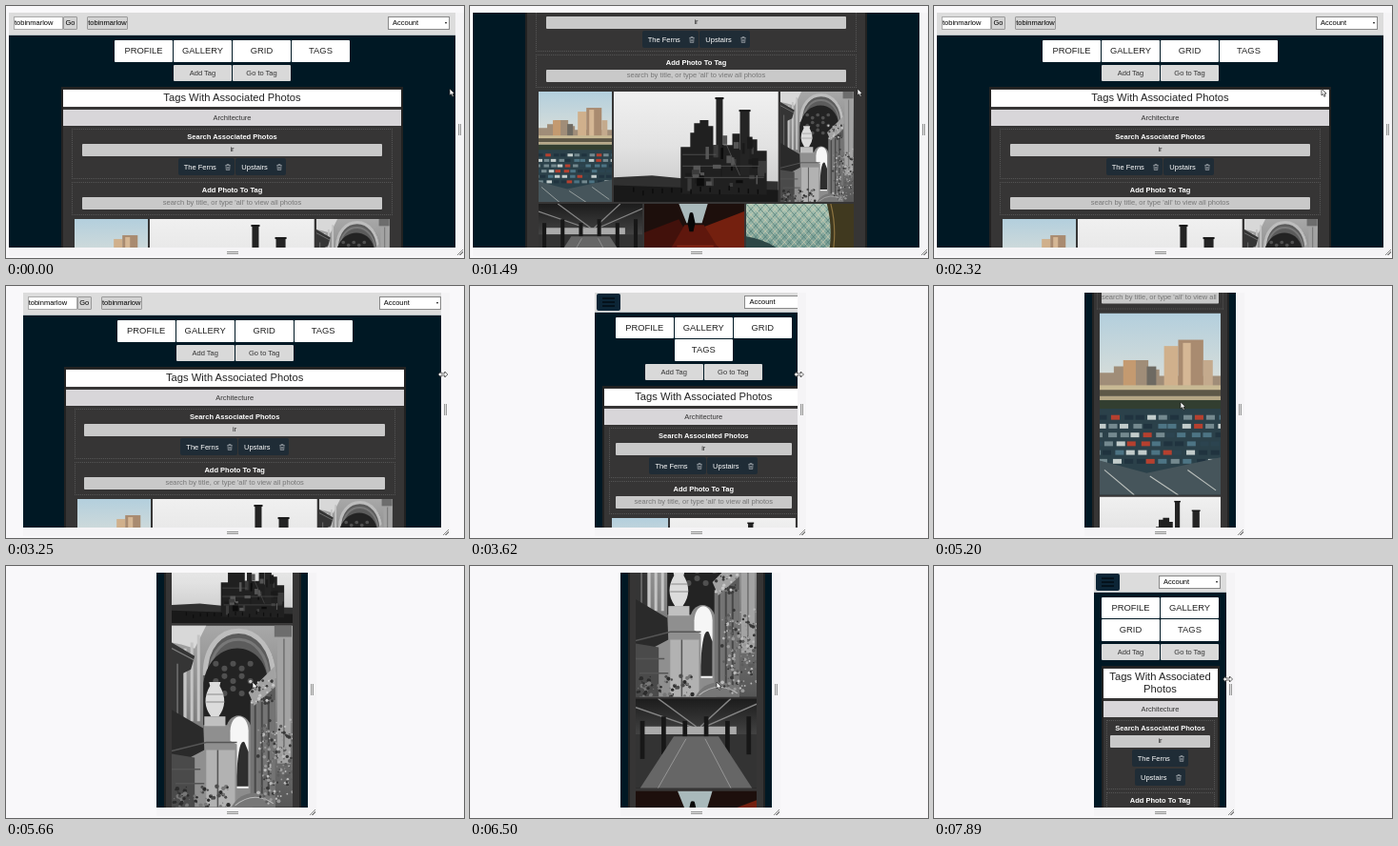
An HTML page that plays this animation: 481 px wide and 265 px high, repeating every 7990 ms.

```html
<!DOCTYPE html>
<html lang="en">
<head>
<meta charset="utf-8">
<title>Responsive photo tags</title>
<style>
* { box-sizing: border-box; }
html, body { margin: 0; width: 100%; height: 100%; overflow: hidden; }
body { position: relative; background: #f9f8fa; font: 7.5px/9px "Liberation Sans", Arial, sans-serif; color: #222; }
#tray, #view, #page, .grip, .cursor, header > * { position: absolute; }
#tray { top: 7px; height: 256px; background: #f5f4f6; }
#view { top: 7px; height: 247px; overflow: hidden; background: #001824; }
#page { left: 0; top: 0; min-height: 1100px; background: #001824; }

header { position: relative; height: 24px; background: #dcdcdc; border-bottom: 1px solid #b5bcc0; }
header > * { top: 4px; height: 14px; line-height: 12px; color: #000; white-space: nowrap; }
.box { background: #fff; border: 1px solid #aaa; overflow: hidden; }
.key { background: #d4d4d4; border: 1px solid #999; text-align: center; border-radius: 1px; }
.find { left: 5px; width: 52px; }
.go { left: 57px; width: 15px; }
.user { left: 82px; width: 43px; }
.account { right: 6px; width: 65px; padding-left: 4px; border-color: #888; }
.account::after { content: ""; position: absolute; right: 2px; top: 5px; border: 1.5px solid transparent; border-top: 2.5px solid #000; }
.menu { display: none; left: 2px; top: 1px; width: 25px; height: 18px; background: #0c2536; border-radius: 2px; padding: 4px 6px; }
.menu i { display: block; height: 1.5px; margin-bottom: 2.7px; background: #04111b; }
.narrow header { height: 20.5px; }
.narrow .find, .narrow .go, .narrow .user { display: none; }
.narrow .menu { display: block; }
.narrow .account { top: 3px; }

nav, .actions, .pills, .photos { display: flex; flex-wrap: wrap; justify-content: center; }
nav { padding-top: 4.5px; }
nav b { width: 61px; height: 22.5px; margin: .5px; background: #fff; border-radius: 1px; font: 9.4px/22.5px "Liberation Sans", Arial, sans-serif; text-align: center; }
.actions { margin-top: 2.5px; }
.actions span { width: 61px; height: 17px; margin: .5px; line-height: 17px; background: #d9d9d9; border-radius: 1px; text-align: center; color: #333; }

main { display: flex; flex-direction: column; gap: 3px; width: calc(100% - 15px); max-width: 359px; margin: 5.5px auto 0; padding: 3px 2px 8px; background: #363535; box-shadow: inset 0 0 0 2px #222; text-align: center; }
h1 { margin: 0; padding: 2px 0 3px; background: #fff; font: 11.2px/13px "Liberation Sans", Arial, sans-serif; }
.tag { height: 17px; line-height: 17px; background: #d8d6d9; color: #333; }
section { margin: 0 2.5%; padding: 2.5px 2.8% 5.5px; border: 1px dotted #555; color: #fff; }
h2 { margin: 0 0 3px; font-size: 7.5px; line-height: 9px; white-space: nowrap; }
.field { height: 13px; line-height: 12.5px; background: #c9c9c9; border-radius: 1px; color: #222; overflow: hidden; white-space: nowrap; }
.hint { color: #777; text-align: left; display: flex; justify-content: safe center; }
.pills { margin: 1.5px 0 -3.5px; }
.pills span { display: flex; align-items: center; gap: 9px; height: 18px; margin: 1px .5px; padding: 0 4.5px 0 6px; background: #1f2c36; border-radius: 2px; white-space: nowrap; }
.pills svg { width: 6px; height: 7px; fill: none; stroke: #a5abb0; }
.photos { margin: 0 2.5%; padding: 0 2px; align-items: flex-start; }
.photos svg { display: block; min-width: 0; margin: 1px; }

.grip { background: linear-gradient(90deg, #999 1px, #ddd 1px 2px, #999 2px); }
#side { top: 124px; width: 3px; height: 12px; }
#base { left: 231.5px; top: 257.5px; width: 12px; height: 3px; background: linear-gradient(#999 1px, #ddd 1px 2px, #999 2px); }
#corner { top: 256px; width: 6px; height: 6px; background: linear-gradient(135deg, transparent 44%, #888 44% 54%, transparent 54% 66%, #888 66% 76%, transparent 76%); }
.cursor { left: 0; top: 0; overflow: visible; stroke: #222; stroke-width: .7; fill: #fff; }
</style>
</head>
<body>
<div id="tray"></div>
<div id="view"><div id="page">
  <header>
    <div class="menu"><i></i><i></i><i></i></div>
    <div class="box find">tobinmarlow</div><div class="key go">Go</div>
    <div class="key user">tobinmarlow</div>
    <div class="box account">Account</div>
  </header>
  <nav><b>PROFILE</b><b>GALLERY</b><b>GRID</b><b>TAGS</b></nav>
  <div class="actions"><span>Add Tag</span><span>Go to Tag</span></div>
  <main>
    <h1>Tags With Associated Photos</h1>
    <div class="tag">Architecture</div>
    <section>
      <h2>Search Associated Photos</h2>
      <div class="field">ir</div>
      <div class="pills"><span>The Ferns</span><span>Upstairs</span></div>
    </section>
    <section>
      <h2>Add Photo To Tag</h2>
      <div class="field hint"><span>search by title, or type 'all' to view all photos</span></div>
    </section>
    <div class="photos"></div>
  </main>
</div></div>
<div id="side" class="grip"></div><div id="base" class="grip"></div><div id="corner" class="grip"></div>
<svg id="arrow" class="cursor" width="1" height="1"><path d="M0 0V7L1.6 5.6 2.8 8.3 4.1 7.7 3 5.1H5.1Z"/></svg>
<svg id="resize" class="cursor" width="1" height="1"><path d="M-5 0L-2-3V-1H2V-3L5 0 2 3V1H-2V3Z"/></svg>

<script>
const LOOP = 7990, CENTER = 237.5;
const $ = selector => document.querySelector(selector);

let seed = 11;
const random = () => (seed = seed * 16807 % 2147483647) / 2147483647;
const between = (a, b) => a + random() * (b - a);
const repeat = (n, make) => Array.from({ length: n }, (_, i) => make(i)).join('');
const pick = list => list[Math.floor(random() * list.length)];
const rect = (x, y, w, h, fill) => `<rect x="${x}" y="${y}" width="${w}" height="${h}" fill="${fill}"/>`;
const dot = (x, y, r, fill) => `<circle cx="${x}" cy="${y}" r="${r}" fill="${fill}"/>`;
const path = (d, fill, extra = '') => `<path d="${d}" fill="${fill}" ${extra}/>`;
const line = (d, stroke, width) => path(d, 'none', `stroke="${stroke}" stroke-width="${width}"`);
const shade = (id, ...colors) => `<linearGradient id="${id}" x2="0" y2="1">${colors.map((c, i) =>
  `<stop offset="${i / (colors.length - 1)}" stop-color="${c}"/>`).join('')}</linearGradient>`;

function city() {
  const car = i => {
    const row = Math.floor(i / 11), y = 65 + row * 5.6;
    return rect((i % 11) * 7.6 - row * 1.5 + between(-1, 1), y, 5.5, 3,
      pick(['#b5402f', '#c2cccb', '#20333f', '#4d7484', '#74898f', '#2c4450']));
  };
  return shade('sky', '#b3cfdd', '#e6e3d8') + rect(0, 0, 77, 60, 'url(#sky)') +
    path('M0 48V38H9V34H17V30H31V36H38V40H77V50H0Z', '#a08d78') +
    rect(15, 30, 8, 18, '#c49a70') + rect(41, 21, 9, 27, '#d0b08c') + rect(50, 17, 16, 31, '#a98b70') +
    rect(53, 19, 5, 29, '#d5b795') + rect(66, 30, 6, 18, '#c4aa8d') + rect(30, 34, 6, 14, '#6e6a62') +
    rect(0, 46, 77, 3, '#c8b994') + rect(0, 49, 77, 4, '#5d5747') + rect(0, 53, 77, 2.5, '#b5a685') +
    rect(0, 55.5, 77, 6.5, '#323e30') + rect(0, 61, 77, 55, '#2b414a') + repeat(66, car) +
    path('M0 94L30 102 77 92V116H0Z', '#46555b') + line('M3 100L22 116M32 104L50 116M56 100L74 113', '#b8bdba', .7);
}

function works() {
  const pipes = repeat(34, () => rect(between(74, 152), between(46, 96), between(1, 9), between(3, 14),
    pick(['#0c0c0c', '#3b3b3b', '#555', '#1a1a1a'])));
  return shade('haze', '#f0f0f0', '#e2e2e2', '#c4c4c4') + rect(0, 0, 172, 116, 'url(#haze)') +
    path('M0 90L40 88 82 92 172 94V116H0Z', '#303030') + path('M0 98L60 100 172 103V116H0Z', '#191919') +
    path('M70 107V58H80V43H84V33H90V30H99V36H104V56H124V44H132V61H140V50H150V62H160V108Z', '#202020') +
    rect(107, 7, 7, 62, '#232323') + rect(106, 6, 9, 2, '#161616') + rect(132, 20, 10, 68, '#242424') +
    rect(131, 19, 12, 2, '#161616') + pipes + line('M72 66H107M72 78H152M74 90H157M118 56L132 88', '#5c5c5c', .7) +
    repeat(14, i => rect(20 + i * 10, between(98, 104), 1.5, 5, '#0d0d0d'));
}

function arch() {
  const speckle = (n, x0, x1, y0, y1, size, fills) =>
    repeat(n, () => dot(between(x0, x1), between(y0, y1), between(.5, size), pick(fills)));
  const coffers = repeat(14, i => dot(46 + i % 5 * 9, 40 + Math.floor(i / 5) * 13 + i % 2 * 5, 3, '#505050'));
  return shade('stone', '#a8a8a8', '#808080', '#565656') + rect(0, 0, 126, 190, 'url(#stone)') +
    path('M0 0H36L24 24 10 20 0 18Z', '#d8d8d8') + line('M14 24V100M21 18V100M28 10V100', '#c4c4c4', 3) +
    path('M33 190V52C33-10 108-10 108 52V190Z', '#5c5c5c') +
    line('M35 52C34-10 106-10 106 55', '#bdbdbd', 5) + line('M40 50C41 2 100 2 101 56', '#787878', 3) +
    path('M33 130V60C40 12 97 12 100 58L84 105Z', '#232323') + coffers +
    path('M56 190V112C57 88 82 88 84 112V190Z', '#8c8c8c') + path('M61 170V110C62 90 79 90 80 110V170Z', '#f6f6f6') +
    path('M67 168Q69 116 76 122L80 132V168Z', '#2e2e2e') + rect(82, 78, 26, 112, '#747474') +
    line('M87 80V180M94 80V180M101 80V180', '#484848', 2) + path('M80 70L108 42V64L86 84Z', '#a2a2a2') +
    speckle(40, 82, 106, 56, 82, 1.8, ['#3a3a3a', '#c8c8c8']) +
    rect(107, 0, 18, 12, '#6d6d6d') + rect(110, 14, 14, 130, '#a3a3a3') + line('M117 14V140', '#707070', 1.5) +
    path('M0 18L24 32 20 46 12 50V104L0 130Z', '#353535') + line('M0 24L23 36M6 40V112', '#808080', 1.2) +
    path('M0 88L34 108V134L0 144Z', '#2a2a2a') + path('M33 104H60V120L68 124V190H4V146L34 130Z', '#8f8f8f') +
    path('M36 130H66V190H36Z', '#b2b2b2') + path('M0 134L24 138V190H0Z', '#4a4a4a') +
    line('M0 131L36 122H68M0 150H30M4 165H34M48 130V190', '#555', 1.5) + rect(34, 95, 22, 10, '#c0c0c0') +
    path('M39 59H51L50 63Q60 80 49 95H41Q30 80 40 63Z', '#dcdcdc') + line('M37 72H54M36 80H55', '#8b8b8b', 1) +
    path('M62 190Q75 166 108 180V190Z', '#777') + line('M66 188Q86 172 106 186', '#bbb', 1) +
    speckle(170, 90, 126, 98, 186, 2, ['#383838', '#999', '#bbb', '#5c5c5c']) +
    speckle(70, 0, 60, 168, 190, 2.4, ['#2c2c2c', '#777', '#4c4c4c']);
}

function garage() {
  return shade('lot', '#1c1c1c', '#4c4c4c', '#1c1c1c') + rect(0, 0, 108, 80, 'url(#lot)') +
    line('M0 8L52 26M20 0L54 25M108 5L60 26M85 0L58 25', '#858585', 1.2) +
    rect(6, 25, 84, 7, '#aaa') + rect(0, 32, 108, 48, '#333') +
    repeat(6, i => rect(4 + i * 19, 20 - i % 2 * 4, 4, 34, '#171717')) +
    path('M34 34H74L104 80H4Z', '#666') + line('M45 36L20 80M62 36L85 80', '#999', .8);
}

function stairs() {
  return rect(0, 0, 104, 80, '#1d0f0c') + path('M0 30L36 16 46 34 0 66Z', '#42110b') +
    path('M62 24L104 8V66L70 40Z', '#74200f') + path('M36 0H66L60 20H44Z', '#a9b9bb') +
    path('M42 22H62L98 80H8Z', '#5f170d') + line('M34 44H72M27 56H80M20 68H87', '#8a2816', 1.5) +
    path('M47 11a2 2 0 1 1 4 0l2 9-2 9H47l-2-9Z', '#070707');
}

function facade() {
  return shade('glass', '#a9c4b4', '#53807b') + rect(0, 0, 112, 80, 'url(#glass)') +
    repeat(40, i => line(`M${i * 5 - 90} 80L${i * 5 - 20} 0M${i * 5 - 80} 0L${i * 5 - 10} 80`, i % 2 ? '#d3cfb4' : '#4d7871', .7)) +
    path('M0 34Q40 40 62 80H0Z', '#2d4746') + path('M84 0H112V80H78Q94 40 84 0Z', '#40391f') +
    line('M88 0Q98 40 82 80', '#8d7440', 1.2);
}

// Rows are justified: every photo grows in proportion to its aspect ratio.
const photos = [[77, 116, city], [172, 116, works], [126, 190, arch], [108, 80, garage], [104, 80, stairs], [112, 80, facade]];
const ROW = 80;
$('.photos').innerHTML = photos.map(([w, h, draw]) => {
  const basis = ROW * w / h;
  return `<svg viewBox="0 0 ${w} ${h}" preserveAspectRatio="none" style="flex:${basis} 1 ${basis}px;aspect-ratio:${w}/${h}">${draw()}</svg>`;
}).join('');
document.querySelectorAll('.pills span').forEach(pill => pill.insertAdjacentHTML('beforeend',
  '<svg viewBox="0 0 6 7"><path d="M.3 1.5H5.7M2 1.3V.4H4V1.3M1 1.8L1.3 6.6H4.7L5 1.8M2.3 3V5.6M3.7 3V5.6" stroke-width=".7"/></svg>'));

// Each track is a list of [time, value].
const widthTrack = [[3130, 469], [3340, 418], [3620, 213], [3800, 178], [4000, 163], [4150, 159], [7540, 159], [7700, 148], [7860, 139]];
const scrollTrack = [[720, 0], [900, 30], [1200, 112], [1380, 134], [1660, 134], [1820, 105], [2050, 24], [2200, 0],
  [4680, 0], [4850, 40], [5660, 475], [5980, 650], [6120, 690], [6320, 690], [6480, 620], [6850, 120], [7080, 0]];
const mouseX = [[100, 466], [600, 407], [2560, 407], [2960, 474], [4180, 319], [4450, 259], [7080, 259], [7400, 318]];
const mouseY = [[2560, 87], [2960, 93], [4180, 93], [4450, 94], [4700, 98], [5100, 122], [7080, 122], [7400, 119]];

function at(track, t) {
  const i = track.findIndex(([time]) => time > t);
  if (i === 0) return track[0][1];
  if (i < 0) return track[track.length - 1][1];
  const [t0, a] = track[i - 1], [t1, b] = track[i];
  return a + (b - a) * (t - t0) / (t1 - t0);
}

function render(now) {
  const t = now % LOOP;
  const width = at(widthTrack, t), layoutWidth = at(widthTrack, t - 22);
  const left = CENTER - width / 2, right = left + width;
  const px = (selector, x) => $(selector).style.left = x + 'px';
  px('#tray', left);
  px('#view', left);
  px('#side', right + 3);
  px('#corner', right + 2);
  $('#tray').style.width = width + 9 + 'px';
  $('#view').style.width = width + 'px';
  $('#page').style.width = layoutWidth + 'px';
  $('#page').style.transform = `translateY(${-at(scrollTrack, t)}px)`;
  $('#page').classList.toggle('narrow', layoutWidth < 360);

  const dragging = t > 2960 && t < 4180 || t > 7400;
  const x = dragging ? right + 1.5 : at(mouseX, t);
  $('#arrow').style.display = dragging ? 'none' : '';
  $('#resize').style.display = dragging ? '' : 'none';
  $(dragging ? '#resize' : '#arrow').style.transform = `translate(${x}px, ${at(mouseY, t)}px)`;
}

const start = performance.now();
(function tick() {
  render(performance.now() - start);
  requestAnimationFrame(tick);
})();
</script>
</body>
</html>
```
